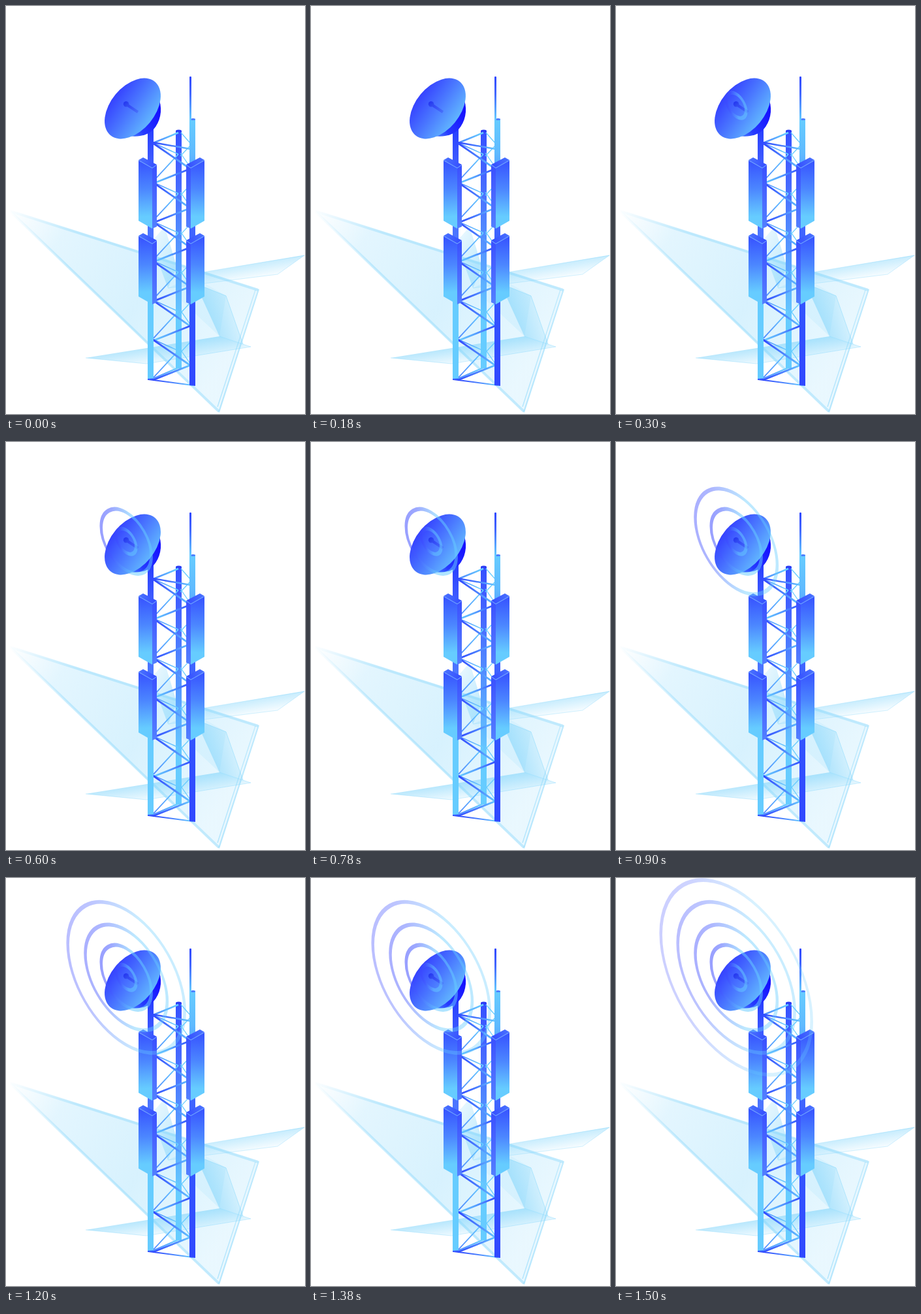
Write an HTML page that moves like this. It is 458 px wide and 625 px high and loops after 1.8 s.

```html
<!DOCTYPE html>
<html lang="en">
<head>
<meta charset="utf-8">
<title>Signal tower</title>
<style>
html, body { margin: 0; width: 100%; height: 100%; overflow: hidden; background: #fff; }
svg { display: block; width: 458px; height: 625px; }
</style>
</head>
<body>
<svg id="stage" viewBox="0 0 458 625" xmlns="http://www.w3.org/2000/svg"></svg>
<script>
const STEP = 300;
const BLUE = '#3048ff', MID = '#4d86ff', CYAN = '#66ccff';
const stage = document.getElementById('stage');

function add(tag, attrs, parent = stage) {
  const node = document.createElementNS('http://www.w3.org/2000/svg', tag);
  for (const key in attrs) node.setAttribute(key, attrs[key]);
  parent.appendChild(node);
  return node;
}

let gradientCount = 0;
// Stops are [offset, colour, opacity]; returns a paint reference.
function gradient([x1, y1, x2, y2], stops, units = 'userSpaceOnUse') {
  const id = 'g' + gradientCount++;
  const node = add('linearGradient', { id, x1, y1, x2, y2, gradientUnits: units });
  for (const [offset, color, opacity = 1] of stops)
    add('stop', { offset, 'stop-color': color, 'stop-opacity': opacity }, node);
  return `url(#${id})`;
}

const poly = (points, fill, extra = {}) => add('polygon', { points, fill, ...extra });
const line = (x1, y1, x2, y2, stroke, width) =>
  add('line', { x1, y1, x2, y2, stroke, 'stroke-width': width });

function drawShadows() {
  const sky = '#7fd4fb';
  const fade = (box, from, to) => gradient(box, [[0, sky, from], [1, sky, to]]);
  const edge = gradient([5, 312, 110, 350], [[0, sky, 0], [1, sky, .38]]);

  poly('4,312 388,434 327,624', gradient([5, 312, 345, 530],
    [[0, sky, 0], [.22, sky, .22], [.6, sky, .31], [1, sky, .17]]));
  line(6, 314, 386, 435, edge, 4);
  line(6, 314, 326, 621, edge, 4);
  line(387, 434, 326, 622, fade([387, 434, 326, 622], .4, .5), 2);
  line(382, 435, 324, 614, fade([382, 435, 324, 614], .35, .5), 1.5);

  poly('457,382 416,411 248,432 300,408', gradient([350, 395, 354, 420],
    [[0, sky, .5], [1, sky, .08]]));
  line(457, 382, 300, 408, fade([457, 382, 300, 408], .55, .2), 1);
  add('polyline', { points: '457,382 416,411 248,432', fill: 'none', stroke: sky,
    'stroke-opacity': .5, 'stroke-width': .7 });

  poly('222,362 243,338 262,400 248,432', fade([222, 370, 262, 390], .2, .45));
  poly('248,432 262,400 337,444 327,506', fade([250, 410, 330, 480], .05, .15));
  poly('290,425 337,444 363,518 327,506', fade([309, 468, 346, 455], .55, .18));
  add('polyline', { points: '290,425 337,444 363,518', fill: 'none', stroke: sky,
    'stroke-opacity': .6, 'stroke-width': .8 });

  poly('122,539 327,506 375,522 215,548', gradient([250, 517, 254, 546],
    [[0, sky, .6], [1, sky, .08]]));
  add('polyline', { points: '122,539 215,548 375,522 327,506', fill: 'none', stroke: sky,
    'stroke-opacity': .55, 'stroke-width': .7 });
}

function drawLeg(x, top, bottom, stops) {
  poly(`${x},${top} ${x + 9},${top} ${x + 9},${bottom + 1} ${x},${bottom}`,
    gradient([0, top, 0, bottom], stops));
}

function drawLattice() {
  const across = gradient([226, 0, 284, 0], [[0, BLUE], [.55, MID], [1, CYAN]]);
  const rising = gradient([226, 0, 284, 0], [[0, CYAN], [.4, '#58a6ff'], [1, BLUE]]);
  const thin = gradient([226, 0, 284, 0], [[0, MID], [.6, CYAN], [1, CYAN]]);

  for (let k = 0; k < 6; k++) {
    const y = 210 + 60.2 * k;
    line(226, y + 58, 264, y + 17, thin, 1.8);
    line(226, y, 264, y + 17, thin, 1.5);
    line(267, y + 20, 283, y + 3, thin, 1.3);
    line(267, y + 15, 283, y + 38, thin, 1.3);
    line(225, y, 283, y + 40, across, 2.8);
    line(225, y + 62, 283, y + 39, k % 2 ? across : rising, 2.8);
  }
  line(225, 210, 264, 194, thin, 2.6);
  line(225, 209, 288, 220, across, 2.4);
  line(268, 194, 283, 211, thin, 1.3);
  line(225, 571, 264, 554, thin, 2.2);
  line(218, 572, 286, 581, across, 2);
}

function drawPanel(dy, mirrored) {
  const shape = (points, fill) => poly(points, fill, {
    transform: mirrored ? `translate(507 ${dy}) scale(-1 1)` : `translate(0 ${dy})`
  });
  shape('203,236 224,248 224,341 203,329',
    gradient([211, 234, 217, 338], [[0, '#354fff'], [.45, '#4c87ff'], [.85, CYAN], [1, CYAN]]));
  shape('224,248 231,243 231,338 224,341',
    gradient([0, 243, 0, 341], [[0, '#3a50ff'], [.6, '#4c6cff'], [1, '#5280ff']]));
  shape('203,236 210,232 231,243 224,248',
    gradient([203, 236, 231, 243], [[0, '#4a73ff'], [1, '#344dff']]));
  shape('203,236 224,247.5 231,243 231,244 224,248.7 203,237', '#6fa5ff');
}

function drawDish() {
  add('path', {
    d: 'M235 145C240 160 236 178 226 189C216 199 202 201 188 199L205 165Z',
    fill: gradient([190, 200, 234, 165], [[0, '#4a83ff'], [.35, '#263aff'], [1, '#1713ff']])
  });
  add('ellipse', {
    rx: 53.3, ry: 34, transform: 'translate(194 157) rotate(-50.3)',
    fill: gradient([-2, -38, 4, 36], [[0, '#333cff'], [.5, '#4a78ff'], [1, '#62b9ff']])
  });
  line(184, 150.5, 202, 162.5,
    gradient([184, 150, 203, 163], [[0, '#2c3cf5'], [1, '#4468f8', .7]]), 4);
  add('circle', { cx: 184, cy: 150.3, r: 4.2,
    fill: gradient([181, 147, 187, 154], [[0, '#2436f2'], [1, '#3450f0']]) });
}

// Circles lying in an isometric plane, smallest first.
function makeRings() {
  const paint = gradient([.15, .85, .85, .15],
    [[0, '#3b48ff'], [.2, '#4259ff'], [.62, CYAN], [1, CYAN]], 'objectBoundingBox');
  const rings = [[20, .5], [47, .52], [75, .43], [106, .35], [136, .26]];
  return rings.map(([radius, opacity]) => add('circle', {
    r: radius - 2.6, fill: 'none', stroke: paint, 'stroke-width': 5.2, opacity,
    transform: 'translate(184.2 152.3) rotate(60) scale(1.2247 .7071)'
  }));
}

drawShadows();
drawLeg(260, 191, 555, [[0, '#3550ff'], [.2, '#4566ff'], [.5, '#5596ff'], [.8, CYAN], [1, CYAN]]);
add('ellipse', { cx: 264.5, cy: 191.5, rx: 4.5, ry: 2, fill: '#2b3cf5' });
drawLattice();
drawLeg(217, 183, 572, [[0, '#263cff'], [.15, '#3f5dff'], [.45, '#4d78ff'], [.7, CYAN], [1, CYAN]]);
poly('217,571 226,570.5 226,573 217,573', '#3558ff');
drawLeg(281, 173, 581, [[0, CYAN], [.13, '#5fbaff'], [.35, '#4268ff'], [.7, '#3354ff'], [1, '#3048ff']]);
add('ellipse', { cx: 286.5, cy: 173.5, rx: 3.5, ry: 1.5, fill: '#4a7dff' });
add('rect', { x: 281, y: 108, width: 3, height: 66, rx: 1,
  fill: gradient([0, 108, 0, 174], [[0, '#3048ff'], [.4, '#4468ff'], [1, CYAN]]) });
for (const dy of [0, 116]) {
  drawPanel(dy, false);
  drawPanel(dy, true);
}
drawDish();
const rings = makeRings();

function render(ms) {
  const visible = Math.floor(ms / STEP) % (rings.length + 1);
  rings.forEach((ring, i) => ring.setAttribute('visibility', i < visible ? 'visible' : 'hidden'));
}

const start = performance.now();
function tick() {
  render(performance.now() - start);
  requestAnimationFrame(tick);
}
render(0);
requestAnimationFrame(tick);
</script>
</body>
</html>
```
